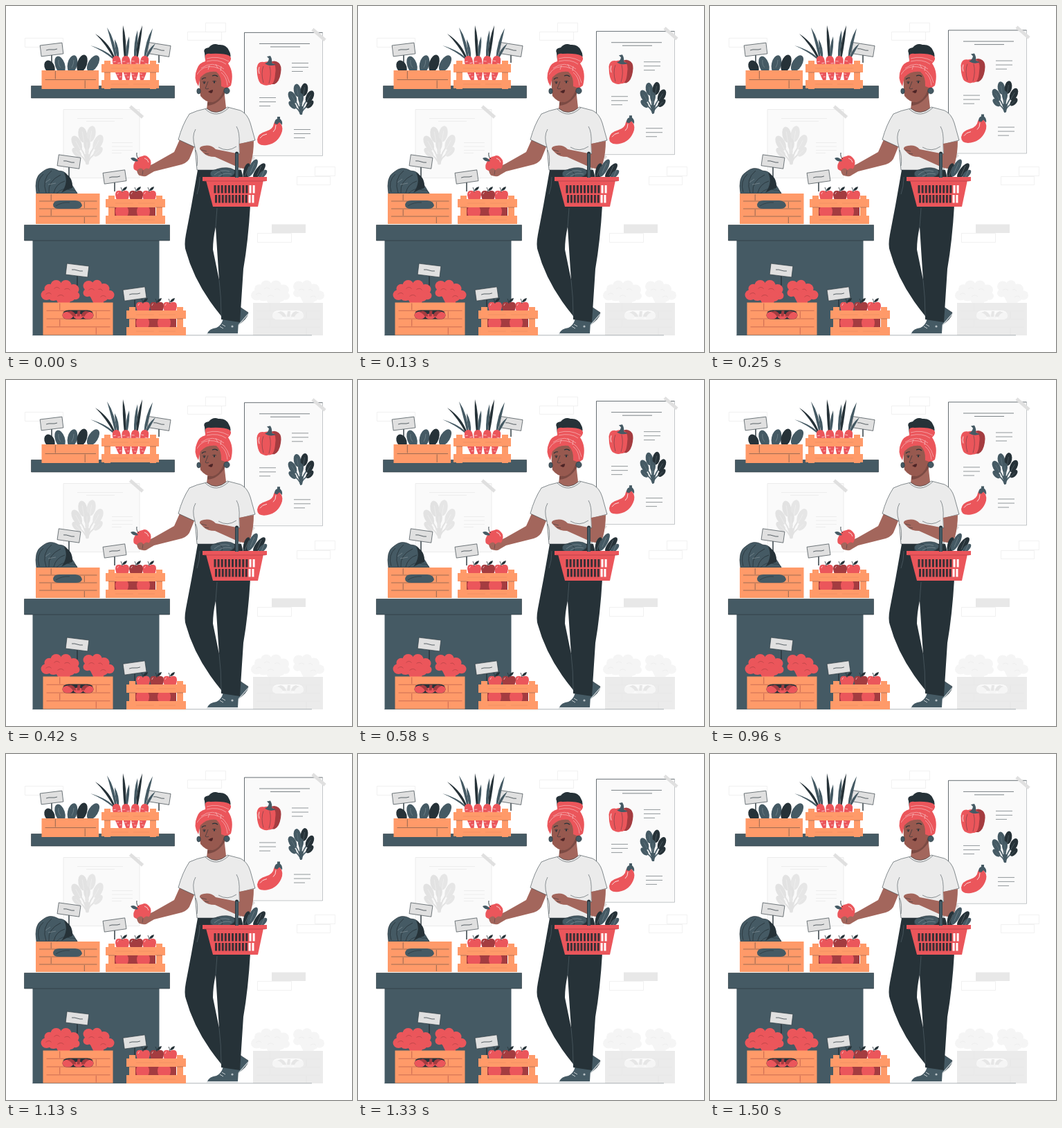
These frames come from a looping animation (500 px wide and 500 px high, 1.54 s). An HTML page with a canvas:

```html
<!DOCTYPE html>
<html lang="en">
<head>
<meta charset="utf-8">
<title>Greengrocer</title>
<style>
html, body { margin: 0; width: 100%; height: 100%; overflow: hidden; background: #fff; }
canvas { display: block; width: 500px; height: 500px; }
</style>
</head>
<body>
<canvas id="stage" width="500" height="500"></canvas>
<script>
const canvas = document.getElementById('stage');
let ctx = canvas.getContext('2d');
const screen2d = ctx;

const RED = '#eb565b', WINE = '#a43c40', ORANGE = '#ff9a69', SLATE = '#455a64', NAVY = '#263238';
const SKIN = '#a3665c', FACE = '#97594f', GREY = '#e0e0e0', PALE = '#ebebeb', MIST = '#f5f5f5', FOG = '#fafafa';
const LOOP = 1540, PEAK = 705, REST = 1510, LIFT = 9.5;

function shape(d, fill, stroke, width = 0.6) {
  const path = new Path2D(d);
  if (fill) { ctx.fillStyle = fill; ctx.fill(path); }
  if (stroke) { ctx.strokeStyle = stroke; ctx.lineWidth = width; ctx.stroke(path); }
}
const line = (d, color = NAVY, width = 0.6) => shape(d, null, color, width);
const box = (x, y, w, h, fill, stroke, width) => shape(`M${x} ${y}h${w}v${h}h${-w}z`, fill, stroke, width);

function oval(x, y, rx, ry, fill, degrees = 0, stroke) {
  ctx.beginPath();
  ctx.ellipse(x, y, rx, ry, degrees * Math.PI / 180, 0, Math.PI * 2);
  ctx.fillStyle = fill;
  ctx.fill();
  if (stroke) { ctx.strokeStyle = stroke; ctx.lineWidth = 0.6; ctx.stroke(); }
}

function at(x, y, degrees, scale, draw) {
  ctx.save();
  ctx.translate(x, y);
  ctx.rotate(degrees * Math.PI / 180);
  ctx.scale(scale, scale);
  draw();
  ctx.restore();
}

function sign(x, y, degrees, stick) {
  line(`M${x} ${y + 7}v${stick}`, NAVY, 1.4);
  at(x, y, degrees, 1, () => {
    box(-16, -8, 32, 16, GREY, NAVY, 0.6);
    line('M-8 0q4 -1 8 0t8 0', NAVY, 0.7);
  });
}

// Slender curved leaf from its root to its tip.
function frond(x, y, tipX, tipY, fill) {
  const mx = x + (tipX - x) * 0.35, my = y + (tipY - y) * 0.6;
  shape(`M${x - 1} ${y}Q${mx - 3.2} ${my} ${tipX} ${tipY}Q${mx + 4} ${my} ${x + 1} ${y}z`, fill);
}

function plankCrate(x, y, w, h, rows, fill = ORANGE, ink = NAVY) {
  box(x, y, w, h, fill);
  for (let i = 1; i < rows; i++) line(`M${x + 5} ${y + h * i / rows}h${w - 9}`, ink, 0.45);
  for (let i = 0; i < rows; i++) {
    const top = y + h * i / rows, px = x + w * (i % 2 ? 0.76 : 0.24);
    line(`M${px} ${top + 1}v${h / rows - 2}`, ink, 0.5);
  }
}

function slatCrate(x, y, w, gap) {
  box(x + 4, y - 5, 9, 41, ORANGE);
  box(x + w - 13, y - 5, 9, 41, ORANGE);
  for (const sy of [y, y + 12 + gap]) {
    box(x, sy, w, 12, ORANGE);
    line(`M${x + 14} ${sy + 6}h${w * 0.3}m7 0h${w * 0.28}`, '#d8825c', 0.4);
  }
  line(`M${x + 4} ${y + 12}h9M${x + w - 13} ${y + 12}h9`, '#6d5248', 0.5);
}

function apple(x, y, fill) {
  shape(`M${x} ${y - 5}q-10 -4 -10 5q1 11 10 11q9 0 10 -11q0 -9 -10 -5z`, fill);
  line(`M${x} ${y - 4}q0 -3 -2 -7`, NAVY, 0.8);
  shape(`M${x} ${y - 6}q1 -5 7 -6q-1 6 -7 6z`, NAVY);
  line(`M${x - 7} ${y - 1}q0 -2 2 -3`, '#fff', 0.6);
}

function appleCrate(x, y) {
  box(x + 13, y + 11, 59, 14, WINE);
  for (const dx of [24, 55]) shape(`M${x + dx - 8} ${y + 11}h15q4 7 0 14h-15q-4 -7 0 -14z`, RED);
  apple(x + 24, y - 6, RED);
  apple(x + 63, y - 6, RED);
  apple(x + 44, y - 6, WINE);
  slatCrate(x, y, 86, 12);
}

const LEFT_HEADS = [[5, -11, 8], [9, -20, 7], [19, -25, 8], [33, -25, 8], [44, -19, 8], [47, -10, 6], [27, -14, 13], [15, -11, 9], [39, -9, 8]];
const RIGHT_HEADS = [[66, -24, 8], [78, -26, 7], [88, -20, 8], [96, -11, 7], [64, -14, 6], [74, -16, 10], [86, -10, 9]];

function broccoliCrate(x, y, fill, hole, stem, wood, ink) {
  for (const [dx, dy, r] of [...LEFT_HEADS, ...RIGHT_HEADS]) oval(x + dx, y + dy, r, r * 0.95, fill);
  shape(`M${x + 16} ${y - 9}h28l-6 10h-16zM${x + 68} ${y - 9}h22l-3 10h-14z`, fill);
  at(x, y, 0, 1, () => line(
    'M4 -12q5 -4 8 0M16 -20q4 -4 8 0M31 -19q5 -3 8 1M21 -9q5 -4 9 0M66 -18q4 -4 8 0M80 -19q4 -2 6 2M83 -8q4 -4 8 0', ink, 0.45));
  plankCrate(x, y, 101, 47, 4, wood, ink);
  at(x, y, 0, 1, () => {
    shape('M28 18q1 -7 9 -7h27q8 0 9 7q0 6 -8 6h-29q-8 0 -8 -6z', hole);
    oval(36, 18.5, 8, 5.5, fill);
    oval(65, 18.5, 8, 5.5, fill);
    oval(51, 20, 7, 4, fill);
    shape('M40 12q6 1 8 8h-5q-3 -5 -8 -6zM50 12h4l-1 8h-4zM62 12q-6 1 -7 8h5q2 -5 7 -6z', stem);
  });
}

// Fan of leaves growing up from a shared base.
function leafFan(x, y, scale, dark, light, vein) {
  at(x, y, 0, scale, () => {
    const leaves = [[-12, -25, -28], [13, -26, 26], [-5, -35, -10], [5, -36, 10], [-12, -14, -45], [13, -15, 43], [0, -24, 0]];
    leaves.forEach(([lx, ly, turn], i) => {
      line(`M0 0Q${lx * 0.2} ${ly * 0.6} ${lx} ${ly}`, dark, 1.6);
      oval(lx, ly, i > 3 ? 3.9 : 5.2, i > 3 ? 7 : 9.5, i % 2 ? light : dark, turn);
      line(`M${lx * 0.35} ${ly * 0.45}L${lx * 1.1} ${ly * 1.1}`, vein, 0.4);
    });
    shape('M-3 -12L-1 0h3L4 -12z', dark);
  });
}

function tape(x, y) {
  at(x, y, 41, 1, () => box(-12, -2.4, 24, 4.8, GREY));
}

function backdrop() {
  const bricks = [[27.5, 46.5, 55, 13], [288.5, 24.5, 29, 13], [262.5, 37.5, 49, 12],
    [446.5, 232.5, 29, 13], [420.5, 246.5, 48, 12], [363.5, 328.5, 49, 13]];
  for (const b of bricks) box(...b, '#fff', PALE, 0.7);
  box(384, 315.5, 49, 12.5, '#e8e8e8');
  box(83, 149.5, 110, 99, FOG, '#e6e6e6', 0.7);
  line('M103 162.5h66M116 166.5h41M153 197.5h30M153 203h30M153 208.5h30M153 212.5h14', '#e4e4e4', 0.6);
  leafFan(117, 229, 1.23, '#e2e2e2', '#e6e6e6', '#f4f4f4');
  tape(188.5, 153);
  broccoliCrate(357, 429, MIST, FOG, '#e6e6e6', PALE, '#e4e4e4');
  line('M38 475.8H442', '#8b959a', 0.7);
}

function poster() {
  box(344.5, 38.4, 113, 178, FOG);
  line('M344.5 216.4V38.4H457.5', NAVY, 0.7);
  line('M457.5 38.4V216.4H344.5', '#59646a', 0.35);
  line('M366 54.5h73M382 59h43', NAVY, 0.6);
  for (const [x, y] of [[413, 82.5], [366, 132.5], [416, 178.5]])
    line(`M${x} ${y}h24m-24 6h24m-24 6h16`, NAVY, 0.5);

  shape('M380 82Q388 77 394 82Q399 86 397 97Q395 110 388 113H376z', WINE);
  shape('M362.5 89Q364 79 373 81Q380 79 386 82Q391 86 389 98Q388 115 380 114Q375 116 370 113Q365 112 363 99z', RED);
  line('M372 87q-4 10 0 24M381 87q3 12 -1 25', NAVY, 0.4);
  line('M366 88q-2 5 0 10', '#fff', 0.8);
  shape('M374 83Q379 82 380 76L377 73L382 72Q385 77 384 82L390 85Q380 88 374 83z', SLATE);

  leafFan(426, 157, 1, SLATE, NAVY, '#7d8d95');

  shape('M393 166Q401 172 399 181Q394 198 377 201Q363 203 363 193Q364 184 376 181Q386 178 387 170Q389 165 393 166z', RED);
  line('M367 191q3 -5 10 -6M390 172q0 7 -4 10', '#fff', 0.8);
  shape('M388 170Q388 164 392 163L392 160L396 160L396 163Q400 166 399 172L395 168L392 171z', SLATE);
  tape(452, 41.5);
  tape(349.5, 213.5);
}

function shelf() {
  box(36.5, 115.5, 207, 17.5, SLATE, NAVY, 0.6);
  sign(66, 63, -7, 15);
  [[63, 88, -28], [78, 85, -18], [96, 84, 13], [110, 83, 18], [126, 83, 32]].forEach(([x, y, turn], i) =>
    oval(x, y, 7, i ? 13 : 10, i === 0 || i === 3 ? NAVY : SLATE, turn));
  line('M76 78q-1 7 3 11M98 78q0 6 -3 11', '#8b9aa1', 0.5);
  plankCrate(51.5, 93, 82.5, 27, 2);

  sign(221, 63, 9, 12);
  const fronds = [[156, 122, 57], [157, 129, 40], [159, 146, 31], [162, 157, 48], [172, 169, 28],
    [174, 178, 44], [186, 190, 35], [189, 197, 28], [200, 212, 32], [202, 216, 54]];
  fronds.forEach(([root, tipX, tipY], i) => frond(root, 77, tipX, tipY, i % 3 === 1 ? NAVY : SLATE));
  [159, 173, 187, 201].forEach((x, i) => at(x, 75, [-10, -4, 4, 10][i], 1, () => {
    shape('M-6 5Q-6 -3 0 -3Q6 -3 6 5Q7 24 1 38Q-6 24 -6 5z', RED);
    line('M-5 5h4M1 8h4M-4 24h4M0 28h3', '#fff', 0.6);
  }));
  slatCrate(138, 84, 83, 11);
}

function counter() {
  box(38.5, 339, 183, 137, SLATE);
  box(26.5, 316.5, 210, 22.5, SLATE, NAVY, 0.6);

  shape('M44 271Q40 247 52 240Q63 230 76 238Q89 238 91 252Q98 262 103 271z', SLATE, NAVY);
  shape('M73 271Q82 261 93 266Q101 265 103 271z', SLATE, NAVY);
  shape('M84 241Q97 247 96 263Q88 265 80 270Q91 255 84 241z', NAVY);
  line('M48 269Q43 253 54 243M58 270Q51 250 66 238M62 270Q60 253 79 244M69 270Q72 257 85 253', NAVY, 0.8);
  line('M57 255l7 -5M61 258l11 -2', '#9aa7ad', 0.5);
  sign(91, 225, 8, 15);
  plankCrate(43, 271, 92.5, 44, 4);
  shape('M68 287q1 -6 9 -6h23q9 1 10 7q-1 5 -9 5h-24q-9 0 -9 -6z', SLATE);
  line('M72 289q9 -6 20 -5', NAVY, 0.6);

  sign(157, 247, -8, 14);
  appleCrate(144, 279);

  sign(103, 382, 7, 16);
  broccoliCrate(53.5, 428.5, RED, NAVY, WINE, ORANGE, '#8e3639');
  sign(186, 416, -8, 12);
  appleCrate(174, 440);
}

function legs() {
  shape('M338 435L350 443Q349 453 333 462L329 454z', SLATE, NAVY);
  shape('M314 452L336 456L335 473H291Q294 466 304 465Q311 462 314 452z', SLATE);
  line('M290 474H335M336 461L350 445', '#c4ccd0', 1.2);
  line('M309 463l5 3M312 460l5 3', '#fff', 0.7);
  oval(327, 463, 1.6, 1.6, '#b9c2c6');
  shape('M277 237H340L353 288Q350 340 343 380L338 457L311 453L311 448Q302 437 295 427Q270 391 260 354Q257 346 260 330L268 288z', NAVY);
  shape('M303 319Q299 337 299 352L308 396Q305 352 303 319z', '#fff');
  line('M305 292L303 319M308 396Q311 420 311 448M280 247q0 14 -4 25', '#62737b', 0.5);
}

function head() {
  shape('M287 68Q284 61 293 60Q299 53 307 56Q318 55 322 64Q327 72 322 79L288 78z', NAVY);
  shape('M314 112L318 147Q307 162 290 149L292 133z', SKIN);
  shape('M291 139Q305 138 315 119L316 127Q306 143 291 144z', '#7b4a43');
  shape('M280 97Q279 116 281 130Q289 140 299 139Q309 136 314 123Q322 122 320 111L312 92z', FACE);
  shape('M288 76Q286 67 296 69Q315 68 323 72Q328 77 321 83Q330 96 325 115L319 119L311 116Q312 102 304 95Q290 93 281 103L278 116Q270 104 276 91Q279 82 288 80z', RED);
  line('M290 76Q306 71 322 80M290 80Q307 76 318 84M276 99Q284 85 301 88Q318 91 323 111M282 90Q298 78 315 91M311 96Q319 102 320 115M303 84l3 6M294 86l-2 6M311 87l-1 7', '#f9c9cb', 0.6);
  line('M283 106q3 -3 6 -2M298 101q5 -2 8 1', NAVY, 1.2);
  oval(286.5, 111, 1.1, 1.6, NAVY);
  oval(301, 110, 1.1, 1.7, NAVY);
  line('M284 110q2 -2 5 0M298 109q3 -2 6 0', NAVY, 0.6);
  line('M292 109Q289 117 288 119Q290 121 293 119', NAVY, 0.6);
  shape('M292 124Q296 121 299 121Q299 126 296 126z', '#4c2426');
  oval(278.5, 123, 2.7, 4, SLATE, 0, NAVY);
  oval(319, 122.5, 4.2, 4.4, SLATE, 0, NAVY);
}

function reachingArm() {
  shape('M251 193L243 211L213 228Q205 232 194 236L190 241Q193 247 202 246L214 239L254 229Q264 226 267 216L273 201z', SKIN);
  shape('M197 217Q202 214 206 219Q211 224 209 230Q208 237 201 238Q191 241 185 236Q183 231 186 226Q189 218 197 217z', RED);
  shape('M180 220Q186 217 191 224Q184 226 180 220z', SLATE);
  line('M192 221Q188 218 189 212', NAVY, 0.9);
  line('M200 220q5 1 6 6', '#fff', 0.7);
  shape('M189 238Q194 232 198 236L197 245Q191 247 189 238zM198 238Q203 232 207 236L204 245Q199 247 198 238z', SKIN);
  line('M198 237l-1 7', NAVY, 0.4);
}

function torso() {
  shape('M290 148Q304 160 320 146L339 151Q349 156 353 169L360 194L337 200L338 237H276L273 204L249 193Q255 171 265 156Q275 151 290 148z', PALE, NAVY, 0.55);
  line('M288 149Q304 164 322 147', NAVY, 0.5);
  line('M273 204Q268 188 274 178M337 200Q338 182 333 174M307 204Q320 212 333 203M276 231q2 -14 -2 -23', NAVY, 0.5);
}

function foldedArm() {
  shape('M337 199L338 214L303 207Q296 200 286 202Q279 203 280 207L286 213Q291 218 302 218L333 232Q348 240 354 227Q358 212 358 195z', SKIN);
  line('M282 208l8 2M287 213l6 1M338 214l-5 -2', NAVY, 0.5);
}

function basket() {
  oval(313, 242, 18, 8, SLATE, -8, NAVY);
  oval(304, 243, 9, 6, SLATE, 10, NAVY);
  line('M301 244q10 -9 22 -5M307 246q9 -6 19 -3', '#9aa7ad', 0.5);
  [[348, 239, 5, 12, 12], [356, 234, 5, 14, 28], [366, 238, 5, 13, 38], [371, 243, 4, 8, 45]].forEach(([x, y, rx, ry, turn], i) => {
    oval(x, y, rx, ry, i % 2 ? SLATE : NAVY, turn);
    line(`M${x - 3} ${y + 7}l6 -14`, '#9aa7ad', 0.4);
  });
  shape('M289 252H372L364 290H299z', RED);
  for (const [y, inset] of [[259, 0], [273, 1.5]]) {
    for (let i = 0; i < 12; i++) {
      const x = 300.5 + inset + i * (5.1 - inset * 0.16);
      box(x, y, 3, 11.5, x > 347 ? '#fff' : '#3a3036');
    }
  }
  box(284, 247, 93, 6, RED);
  line('M286 253H375', WINE, 0.6);
  line('M333.5 213V248', NAVY, 5);
  oval(333.5, 213, 2.5, 2.5, NAVY);
  line('M333.7 213V248', SLATE, 3.8);
}

function cached(...parts) {
  const layer = document.createElement('canvas');
  layer.width = layer.height = 500;
  ctx = layer.getContext('2d');
  parts.forEach(part => part());
  ctx = screen2d;
  return layer;
}

const back = cached(backdrop);
const front = cached(shelf, counter, legs, reachingArm, head, torso, foldedArm, basket);

function posterShift(t) {
  return -LIFT * (t < PEAK ? t / PEAK : Math.max(0, (REST - t) / (REST - PEAK)));
}

function render(now) {
  ctx.fillStyle = '#fff';
  ctx.fillRect(0, 0, 500, 500);
  ctx.drawImage(back, 0, 0);
  at(0, posterShift(now % LOOP), 0, 1, poster);
  ctx.drawImage(front, 0, 0);
}

const start = performance.now();
function tick() {
  render(performance.now() - start);
  requestAnimationFrame(tick);
}
tick();
</script>
</body>
</html>
```
